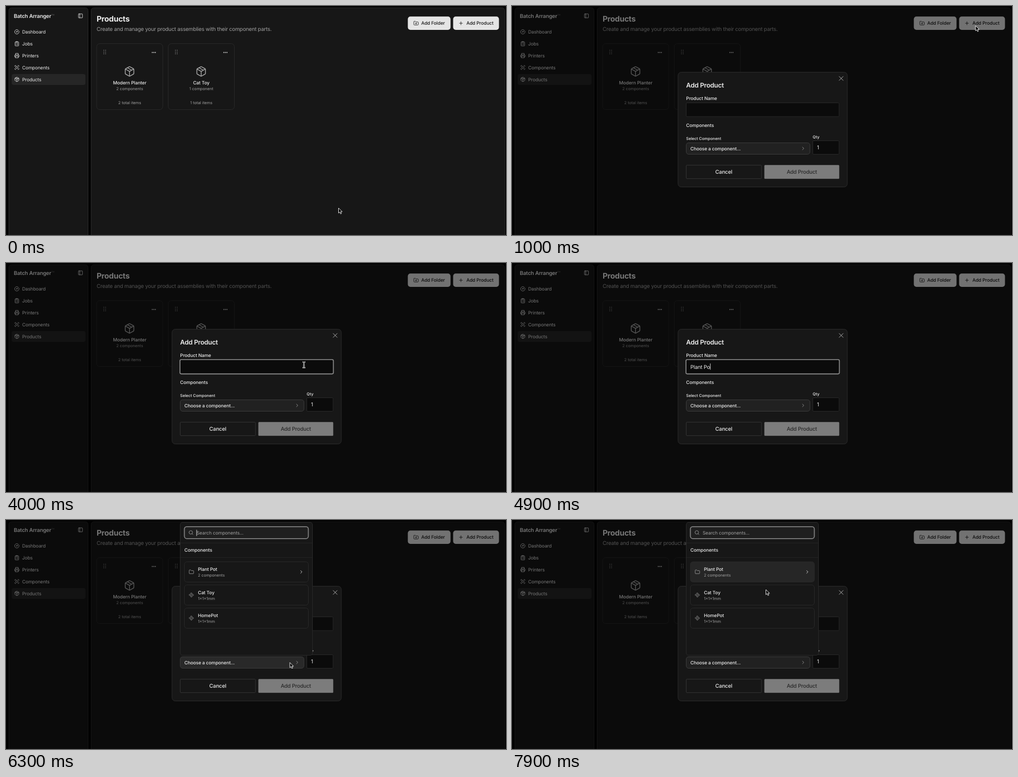
These frames come from a looping animation (960 by 441 pixels, 8000 ms). An HTML page:

```html
<!DOCTYPE html>
<html lang="en">
<head>
<meta charset="utf-8">
<title>Products</title>
<style>
html, body { margin: 0; height: 100%; overflow: hidden; background: #040404; }
svg { display: block; width: 960px; height: 441px; }
text { font-family: Inter, "Noto Sans", sans-serif; white-space: pre; text-rendering: geometricPrecision; }
</style>
</head>
<body>
<svg id="stage" viewBox="0 0 960 441"></svg>
<script>
const LIGHT = '#ececec', GREY = '#a1a1a1', PANEL = '#171717', LINE = '#292929';
const LARGE = 10.16, BASE = 8.89, SMALL = 7.62;

const ICONS = {
  panel: 'M5 3h14a2 2 0 0 1 2 2v14a2 2 0 0 1-2 2H5a2 2 0 0 1-2-2V5a2 2 0 0 1 2-2zM9 3v18',
  gauge: 'M15.6 2.7a10 10 0 1 0 5.7 5.7M13.4 10.6 19 5M10 12a2 2 0 1 0 4 0 2 2 0 1 0-4 0',
  jobs: 'M9 2h6v4H9zM16 4h2a2 2 0 0 1 2 2v14a2 2 0 0 1-2 2H6a2 2 0 0 1-2-2V6a2 2 0 0 1 2-2h2M12 11h4M12 16h4M8 11h.01M8 16h.01',
  printer: 'M6 18H4a2 2 0 0 1-2-2v-5a2 2 0 0 1 2-2h16a2 2 0 0 1 2 2v5a2 2 0 0 1-2 2h-2M6 9V2h12v7M6 14h12v8H6z',
  scan: 'M3 7V5a2 2 0 0 1 2-2h2M17 3h2a2 2 0 0 1 2 2v2M21 17v2a2 2 0 0 1-2 2h-2M7 21H5a2 2 0 0 1-2-2v-2M12 7l4.5 2.5v5L12 17l-4.5-2.5v-5z',
  box: 'M11 21.7a2 2 0 0 0 2 0l7-4a2 2 0 0 0 1-1.7V8a2 2 0 0 0-1-1.7l-7-4a2 2 0 0 0-2 0l-7 4A2 2 0 0 0 3 8v8a2 2 0 0 0 1 1.7zM12 22V12M3.3 7 12 12l8.7-5M7.5 4.3l9 5.1',
  folder: 'M20 20a2 2 0 0 0 2-2V8a2 2 0 0 0-2-2h-7.9a2 2 0 0 1-1.7-.9L9.6 3.9A2 2 0 0 0 7.9 3H4a2 2 0 0 0-2 2v13a2 2 0 0 0 2 2z',
  plus: 'M5 12h14M12 5v14',
  cross: 'M4 4l16 16M20 4 4 20',
  chevron: 'M9 18l6-6-6-6',
  search: 'M3 11a8 8 0 1 0 16 0 8 8 0 1 0-16 0M21 21l-4.3-4.3',
  parts: 'M5.5 8.5 9 12l-3.5 3.5L2 12zM12 2l3.5 3.5L12 9 8.5 5.5zM18.5 8.5 22 12l-3.5 3.5L15 12zM12 15l3.5 3.5L12 22l-3.5-3.5z',
  grip: 'M8 4h.01M8 12h.01M8 20h.01M16 4h.01M16 12h.01M16 20h.01',
  dots: 'M5 12h.01M12 12h.01M19 12h.01'
};
ICONS.folderPlus = ICONS.folder + 'M12 10v6M9 13h6';

const tracking = size => size > 10 ? -.02 : size > 8 ? -.01 : 0;

const text = (x, y, str, size = BASE, weight = 500, fill = LIGHT, extra = '') =>
  `<text x="${x}" y="${y}" font-size="${size}" font-weight="${weight}" fill="${fill}"
    letter-spacing="${tracking(size)}em" ${extra}>${str}</text>`;

const centred = (x, y, str, size, weight, fill) =>
  text(x, y, str, size, weight, fill, 'text-anchor="middle"');

const rect = (x, y, w, h, r, fill, stroke = 'none', extra = '') =>
  `<rect x="${x}" y="${y}" width="${w}" height="${h}" rx="${r}" fill="${fill}" stroke="${stroke}" ${extra}/>`;

const icon = (cx, cy, name, color = LIGHT, size = LARGE, width = 2) =>
  `<path transform="translate(${cx} ${cy}) scale(${size / 24}) translate(-12 -12)" d="${ICONS[name]}"
    fill="none" stroke="${color}" stroke-width="${width}" stroke-linecap="round" stroke-linejoin="round"/>`;

const caret = (id, x, y) => rect(x, y, .9, 12, 0, LIGHT, 'none', `id="${id}"`);

const card = (x, name, count, total) =>
  rect(x, 72.5, 127, 127, 6, PANEL, LINE) +
  icon(x + 15.5, 88.7, 'grip', GREY, LARGE, 3.4) +
  icon(x + 109.8, 89.5, 'dots', LIGHT, LARGE, 4.4) +
  icon(x + 63.2, 126, 'box', GREY, 22, 1.7) +
  centred(x + 63.5, 151, name) +
  centred(x + 63.5, 162.2, count, SMALL, 400, GREY) +
  centred(x + 63.5, 189.3, total, SMALL, 400, GREY);

const rowTop = i => 80.5 + i * 44.5;
const row = (name, sub, i) => {
  const y = rowTop(i);
  return rect(342.5, y, 238, 39, 5, PANEL, LINE, `id="row${i}"`) +
    icon(356, y + 19.5, i ? 'parts' : 'folder', GREY) +
    text(368.5, y + 17.7, name) +
    text(368.5, y + 28.8, sub, SMALL, 400, GREY);
};

const nav = [['gauge', 'Dashboard'], ['jobs', 'Jobs'], ['printer', 'Printers'], ['scan', 'Components'], ['box', 'Products']];

const page =
  rect(5.5, 3.5, 152, 450, 5, PANEL, LINE) +
  rect(163.5, 3.5, 794, 450, 5, PANEL, LINE) +
  text(15, 22.7, 'Batch Arranger<tspan fill="#555" font-weight="400">™</tspan>', LARGE, 600) +
  icon(143, 19, 'panel') +
  rect(11, 131, 141.5, 21, 4, '#262626') +
  nav.map(([name, label], i) =>
    icon(20.9, 49.7 + i * 22.9, name) + text(31, 52.9 + i * 22.9, label, BASE, 400)).join('') +
  text(174, 30, 'Products', 14.9, 700) +
  text(174, 48.2, 'Create and manage your product assemblies with their component parts.', LARGE, 400, GREY) +
  rect(771.5, 20.3, 82, 25.7, 5, '#e5e5e5') +
  icon(787.3, 33.2, 'folderPlus', PANEL) +
  text(797.3, 36.4, 'Add Folder', BASE, 500, PANEL) +
  rect(858.5, 20.3, 88, 25.7, 5, '#e5e5e5', 'none', 'id="addButton"') +
  icon(873.5, 33.2, 'plus', PANEL) +
  text(884, 36.4, 'Add Product', BASE, 500, PANEL) +
  card(174, 'Modern Planter', '2 components', '2 total items') +
  card(311.5, 'Cat Toy', '1 component', '1 total items');

const dialog =
  rect(0, 0, 960, 441, 0, '#000', 'none', 'opacity=".5"') +
  rect(318.8, 127.5, 325, 221, 6.3, PANEL, '#2c2c2c') +
  text(334.3, 156.9, 'Add Product', 12.5, 600) +
  icon(632, 139.5, 'cross', '#bbb', 11.4) +
  text(334.3, 181, 'Product Name') +
  rect(334.5, 186.5, 293.5, 26.5, 1.5, '#0b0b0b', LINE) +
  rect(334, 186, 294.6, 27.6, 2.5, 'none', '#8e8e8e', 'id="ring" stroke-width="1.6"') +
  text(342.5, 203.6, '', LARGE, 400, LIGHT, 'id="field"') +
  caret('caret', 342.6, 193.5) +
  text(334.3, 233.2, 'Components') +
  text(334.3, 258.2, 'Select Component', SMALL) +
  text(577.3, 254.5, 'Qty', SMALL) +
  rect(334.5, 263.5, 237.5, 22, 4.5, '#212121', '#3c3c3c', 'id="select"') +
  text(342.5, 277.5, 'Choose a component...') +
  icon(559, 274.3, 'chevron', GREY) +
  rect(577.5, 259.5, 50.5, 26, 1.5, '#0b0b0b', LINE) +
  text(585.5, 276.3, '1', LARGE, 400) +
  rect(334.5, 306.5, 144.5, 26, 1.5, PANEL, '#333') +
  centred(406.6, 323.4, 'Cancel', LARGE) +
  rect(484.5, 306.2, 143.8, 26.6, 1.5, '#7c7c7c') +
  centred(556.5, 323.4, 'Add Product', LARGE, 500, '#2a2a2a');

const popup =
  rect(334.5, 4.5, 254, 256, 4.5, PANEL, LINE) +
  rect(342.5, 12.8, 238, 23, 4.5, '#1f1f1f', '#808080', 'stroke-width="1.8"') +
  icon(355.2, 24.3, 'search', GREY) +
  text(366, 27.5, 'Search components...', BASE, 400, GREY) +
  caret('searchCaret', 365.6, 18.8) +
  `<path d="M335 44.2h253M335 72.2h253" stroke="${LINE}" stroke-width=".8"/>` +
  text(342.5, 61.2, 'Components') +
  [['Plant Pot', '2 components'], ['Cat Toy', '1×1×1mm'], ['HomePot', '1×1×1mm']]
    .map(([name, sub], i) => row(name, sub, i)).join('') +
  icon(567, 100, 'chevron', LIGHT);

const beamPath = 'M-3-5.5Q0-5.5 0-4Q0-5.5 3-5.5M0-4V4M-3 5.5Q0 5.5 0 4Q0 5.5 3 5.5M-1.5 1h3';
const pointers =
  `<path id="arrow" d="M0 0V9.8L2.3 7.7 3.9 11.3 5.6 10.5 4 7.1H7Z" fill="#000" stroke="#fff" stroke-width=".9" stroke-linejoin="round"/>
  <g id="beam" fill="none"><path d="${beamPath}" stroke="#ddd" stroke-width="2.2"/>
  <path d="${beamPath}" stroke="#333" stroke-width=".7"/></g>`;

const stage = document.getElementById('stage');
stage.innerHTML = page + `<g id="dialog">${dialog}</g><g id="popup">${popup}</g>` + pointers;
const el = id => document.getElementById(id);
const show = (id, on) => el(id).setAttribute('visibility', on ? 'inherit' : 'hidden');
const fill = (id, color) => el(id).setAttribute('fill', color);

// pointer stops: time, x, y
const stops = [
  [0, 638.5, 389], [300, 818, 157], [400, 818, 157], [700, 890, 38], [1300, 890, 38],
  [2300, 572, 196], [5300, 572, 196], [5800, 545, 279], [6000, 545, 274.5], [6400, 545, 274.5],
  [7300, 498, 95], [7600, 508.5, 107.5], [7800, 508.5, 107.5], [7900, 487.5, 134]
];
const typing = [[4200, 'P'], [4400, 'Pla'], [4500, 'Plan'], [4600, 'Plant '], [4800, 'Plant P'], [4900, 'Plant Po'], [5400, 'Plant Pot']];

function pointerAt(t) {
  const i = stops.findIndex(s => s[0] >= t);
  if (i <= 0) return stops[0].slice(1);
  const [t0, x0, y0] = stops[i - 1], [t1, x1, y1] = stops[i];
  const k = (t - t0) / (t1 - t0), e = k * k * (3 - 2 * k);
  return [x0 + (x1 - x0) * e, y0 + (y1 - y0) * e];
}

const inside = ([x, y], l, t, r, b) => x > l && x < r && y > t && y < b;
const blink = (t, start) => Math.floor((t - start) / 500) % 2 === 0;

function draw(now) {
  const t = Math.floor(now % 8000 / 100) * 100;
  const pos = pointerAt(t), last = pointerAt(Math.max(0, t - 100));
  const open = t >= 1000, list = t >= 6200, focus = t >= 2500 && !list;

  show('dialog', open);
  show('popup', list);
  show('ring', focus);
  fill('addButton', !open && inside(pos, 858, 20, 947, 46) ? '#d0d0d0' : '#e5e5e5');
  fill('select', inside(last, 334, 263, 572, 286) ? '#292929' : '#212121');
  for (let i = 0; i < 3; i++) {
    const y = rowTop(i);
    fill('row' + i, inside(last, 342, y, 581, y + 39) ? '#262626' : PANEL);
  }

  const typed = typing.filter(s => s[0] <= t).pop() || [2500, ''];
  el('field').textContent = list ? '' : typed[1];
  el('caret').setAttribute('x', 342.6 + (typed[1] && focus ? el('field').getComputedTextLength() : 0));
  show('caret', focus && blink(t, typed[0]));
  show('searchCaret', list && blink(t, 6200));

  const opening = t === 6200;
  el('popup').setAttribute('transform', opening ? 'translate(461.5 260.5) scale(.965) translate(-461.5 -260.5)' : '');
  el('popup').setAttribute('opacity', opening ? .6 : 1);

  const hidden = t >= 4100 && t < 5400;
  const overField = open && !list && inside(pos, 334, 186, 628, 213);
  show('arrow', !hidden && !overField);
  show('beam', !hidden && overField);
  for (const id of ['arrow', 'beam']) el(id).setAttribute('transform', `translate(${pos})`);
}

const start = performance.now();
function tick() {
  draw(performance.now() - start);
  requestAnimationFrame(tick);
}
tick();
</script>
</body>
</html>
```
